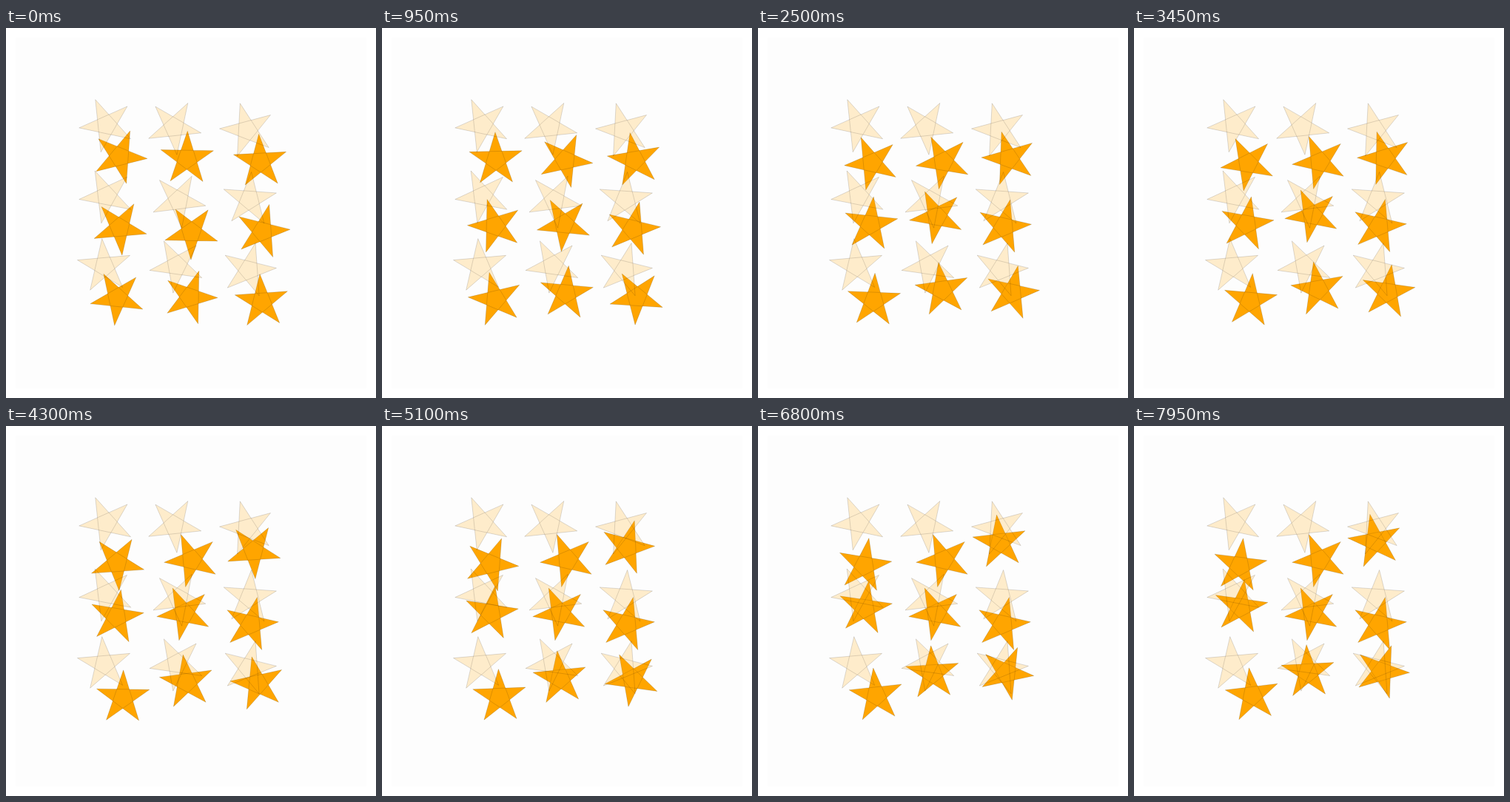
Write an HTML page with a canvas that moves like this. It is 500 px wide and 500 px high and loops after 8000 ms.

```html
<!DOCTYPE html>
<html lang="en">
<head>
<meta charset="utf-8">
<title>Drifting stars</title>
<style>
  html, body { margin: 0; width: 100%; height: 100%; overflow: hidden; background: #fff; }
  canvas { display: block; width: 500px; height: 500px; }
</style>
</head>
<body>
<canvas id="stage" width="500" height="500"></canvas>
<script>
const ctx = document.getElementById('stage').getContext('2d');
const LOOP = 8000, TICK = 50, TURNING_POINT = 3450, END = 7950;
const RADIUS = 37.5;
const SHIFT = { x: 17.6, y: 42.8 };  // from every home to its moving star's start
const stars = [];

const pose = (x, y, angle) => ({ x, y, angle });

// Each star leaves its shifted home, eases to a middle pose, then to a last one.
function addStar(home, startAngle, middle, last = middle) {
  const start = pose(home.x + SHIFT.x, home.y + SHIFT.y, startAngle);
  stars.push({ home, start, middle, last });
}

addStar(pose(136, 131, -24), 22, pose(154, 183, -27), pose(143, 189, -65));
addStar(pose(227, 134, 30), 1, pose(251, 181, 49));
addStar(pose(326, 138, -15), -3, pose(339, 176, -17), pose(326, 156, -83));
addStar(pose(136, 227, -25), 31, pose(152, 265, 82), pose(144, 245, 80));
addStar(pose(233, 233, 29), 37, pose(241, 253, 47));
addStar(pose(329, 232, 4), 14, pose(331, 268, 13));
addStar(pose(133, 322, -5), -30, pose(157, 369, 5), pose(160, 364, -7));
addStar(pose(231, 321, -28), 19, pose(249, 353, -10), pose(235, 333, -3));
addStar(pose(328, 327, 14), -4, pose(343, 357, -64), pose(335, 332, -124));

const easeOut = k => 1 - (1 - k) ** 2;

function between(a, b, k) {
  const mix = key => a[key] + (b[key] - a[key]) * k;
  return pose(mix('x'), mix('y'), mix('angle'));
}

function poseAt({ start, middle, last }, time) {
  return time < TURNING_POINT
    ? between(start, middle, easeOut(time / TURNING_POINT))
    : between(middle, last, easeOut((time - TURNING_POINT) / (END - TURNING_POINT)));
}

// One closed line through every second tip, so the inner pentagon shows.
function drawStar({ x, y, angle }, fill) {
  ctx.beginPath();
  for (let k = 0; k < 5; k++) {
    const tip = (angle + 144 * k) * Math.PI / 180;
    ctx.lineTo(x + RADIUS * Math.sin(tip), y - RADIUS * Math.cos(tip));
  }
  ctx.closePath();
  ctx.fillStyle = fill;
  ctx.fill();
  ctx.stroke();
}

function render(now) {
  const time = Math.floor(now % LOOP / TICK) * TICK;
  ctx.clearRect(0, 0, 500, 500);
  ctx.fillStyle = '#fdfdfd';
  ctx.fillRect(13, 13, 474, 474);
  ctx.lineWidth = 0.14;
  ctx.strokeStyle = '#000';
  stars.forEach(star => drawStar(poseAt(star, time), '#ffa500'));
  stars.forEach(star => drawStar(star.home, 'rgba(255, 165, 0, 0.2)'));
}

const start = performance.now();
function frame() {
  render(performance.now() - start);
  requestAnimationFrame(frame);
}
frame();
</script>
</body>
</html>
```
